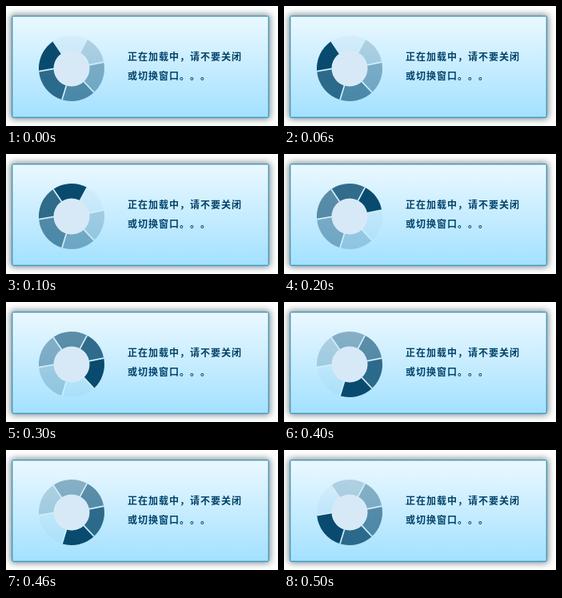
Animation of 340 by 150 pixels, one loop 0.6 s. Source, as an HTML page:

```html
<!DOCTYPE html>
<html lang="zh-CN">
<head>
<meta charset="utf-8">
<title>正在加载</title>
<style>
html, body { margin: 0; width: 100%; height: 100%; overflow: hidden; background: #fff; }
svg { display: block; position: absolute; left: 0; top: 0; }
.panel {
  position: absolute; left: 7px; top: 12px; width: 322px; height: 128px;
  box-sizing: border-box; border: 1px solid #4798b8; border-radius: 2px;
  background: linear-gradient(#ebf8ff, #a3e1ff);
  box-shadow: 0 0 8px 1px rgba(50, 75, 90, .7), inset 0 0 0 1px rgba(71, 152, 184, .4);
}
.msg {
  position: absolute; left: 152px; top: 51px; margin: 0; white-space: nowrap;
  font: bold 12px/24px "Noto Sans CJK SC", "Noto Sans CJK", sans-serif;
  letter-spacing: 1px; text-spacing-trim: space-all; color: #00426a;
}
</style>
</head>
<body>
<div class="panel"></div>
<svg width="340" height="150" viewBox="0 0 340 150">
  <g id="ring" fill="#084b6f"></g>
  <g id="gaps" stroke="#d0edfb" stroke-width="1.7"></g>
  <circle cx="82" cy="78" r="22.5" fill="#d7e9f7"/>
</svg>
<p class="msg">正在加载中，请不要关闭<br>或切换窗口。。。</p>
<script>
const NS = "http://www.w3.org/2000/svg";
const CX = 82, CY = 78, OUTER = 41, INNER = 22;
const STEP = 100;
// Clockwise from the top: [outer, inner] angle of each divider
const cuts = [[265, 269], [326, 326], [388, 388], [439, 439], [497, 497], [557, 557]];
// Opacity by distance clockwise from the darkest wedge
const levels = [1, 0.03, 0.2, 0.4, 0.6, 0.8];
const n = levels.length;

function polar(r, deg) {
  const a = deg * Math.PI / 180;
  return [CX + r * Math.sin(a), CY - r * Math.cos(a)];
}

function add(parent, tag, attrs) {
  const el = document.createElementNS(NS, tag);
  for (const key in attrs) el.setAttribute(key, attrs[key]);
  return document.getElementById(parent).appendChild(el);
}

cuts.forEach(([o1, i1], k) => {
  const [o2, i2] = cuts[(k + 1) % n];
  const wedge = add("ring", "path", {
    d: `M${polar(INNER, i1)} L${polar(OUTER, o1)} A${OUTER} ${OUTER} 0 0 1 ${polar(OUTER, o2)}` +
       ` L${polar(INNER, i2)} A${INNER} ${INNER} 0 0 0 ${polar(INNER, i1)}Z`
  });
  const [x1, y1] = polar(INNER, i1), [x2, y2] = polar(OUTER, o1);
  add("gaps", "line", { x1, y1, x2, y2 });

  const frames = Array.from({ length: n + 1 }, (_, t) => ({
    opacity: levels[(k - t + n) % n],
    offset: t / n,
    easing: "steps(1, end)"
  }));
  wedge.animate(frames, { duration: n * STEP, iterations: Infinity }).startTime = 0;
});
</script>
</body>
</html>
```
